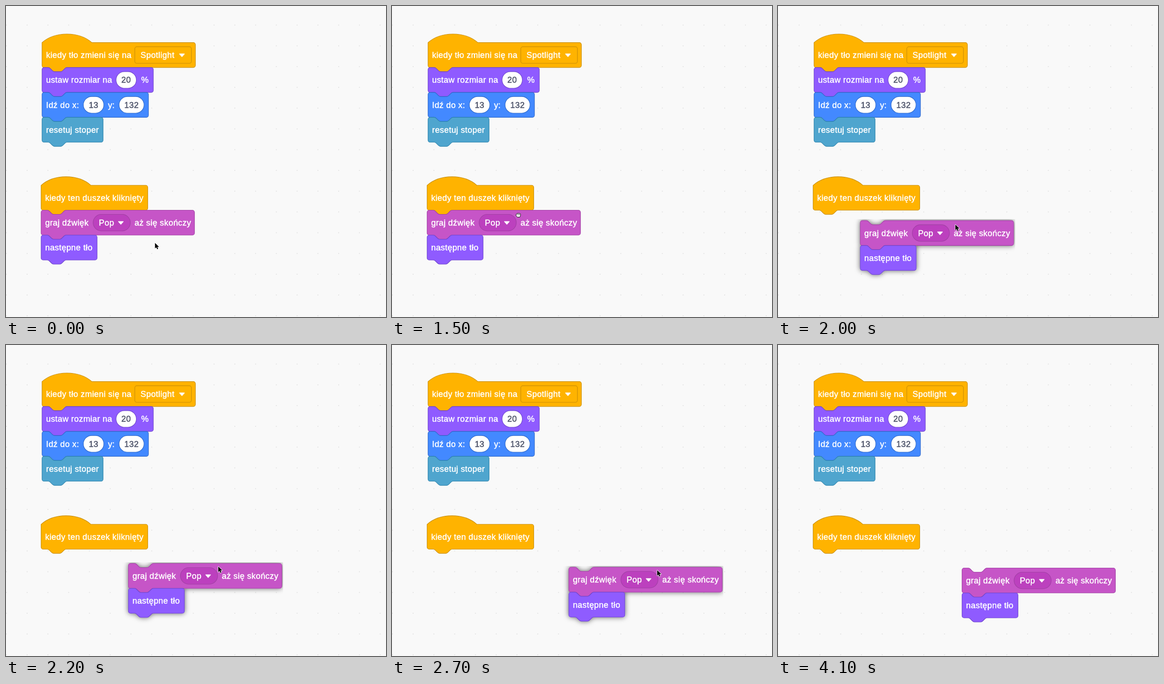
Animation of 827x677 px, one loop 4.2 s. Source, as an HTML page:

```html
<!DOCTYPE html>
<html lang="pl">
<head>
<meta charset="utf-8">
<style>
  html, body { margin: 0; width: 100%; height: 100%; overflow: hidden; background: #f9f9f9; }
  svg { display: block; }
  text {
    font: 16px "Liberation Sans", Arial, sans-serif; letter-spacing: .35px;
    fill: #fff; stroke: #fff; stroke-width: .45;
  }
  .number { fill: #4c5268; stroke: #4c5268; text-anchor: middle; }
</style>
</head>
<body>
<svg id="stage" width="827" height="677" viewBox="0 0 827 677">
  <defs>
    <pattern id="grid" x="23.4" y="18.9" width="45.2" height="45.2" patternUnits="userSpaceOnUse">
      <circle cx="22.6" cy="22.6" r="1.1" fill="#dcdcdc"/>
    </pattern>
    <filter id="shadow" filterUnits="userSpaceOnUse" x="-30" y="-2" width="327.4" height="150">
      <feDropShadow dx="0" dy="0" stdDeviation="5.3" flood-color="#000" flood-opacity=".6"/>
    </filter>
  </defs>
  <rect width="827" height="677" fill="url(#grid)"/>
</svg>
<script>
const SCALE = 1.13, ROW = 48;
const stage = document.getElementById('stage');
const $ = id => document.getElementById(id);

const colors = {
  event: ['#ffb300', '#c88d08'],
  looks: ['#8f5bff', '#6f47cc'],
  motion: ['#4389ff', '#2f68c8'],
  sensing: ['#4fa5ce', '#2b83ad'],
  sound: ['#c655c7', '#a03fa3']
};

// Block outlines, in editor units
const notch = 'H12c2 0 3 1 4 2l4 4c1 1 2 2 4 2h12c2 0 3-1 4-2l4-4c1-1 2-2 4-2';
const tab = 'H48c-2 0-3 1-4 2l-4 4c-1 1-2 2-4 2h-12c-2 0-3-1-4-2l-4-4c-1-1-2-2-4-2';
const outline = (width, hat) =>
  (hat ? 'M0 0c25-22 71-22 96 0' : 'M0 4a4 4 0 0 1 4-4' + notch) +
  `H${width - 4}a4 4 0 0 1 4 4v40a4 4 0 0 1-4 4${tab}H4a4 4 0 0 1-4-4z`;

const label = (x, words) => `<text x="${x}" y="29.7">${words}</text>`;
const field = (x, width, radius, fill) =>
  `<rect x="${x}" y="8" width="${width}" height="32" rx="${radius}" fill="${fill}"/>`;
const number = (x, width, value) => field(x, width, 16, '#fff') +
  `<text class="number" stroke="none" x="${x + width / 2}" y="29.7">${value}</text>`;
const menu = (x, width, radius, fill, words) => field(x, width, radius, fill) +
  label(x + 11, words) +
  `<path transform="translate(${x + width - 18.2} 24.4)" d="M-4.5-2.5h9L0 2.5z"
    fill="#fff" stroke="#fff" stroke-width="1.5" stroke-linejoin="round"/>`;

function block(row, kind, width, content, hat) {
  const [fill, edge] = colors[kind];
  return `<g transform="translate(0 ${row * ROW})" stroke="${edge}">
    <path d="${outline(width, hat)}" fill="${fill}"/>${content}</g>`;
}
const place = (x, y) => `translate(${x} ${y}) scale(${SCALE})`;
const stack = (id, x, y, content) =>
  `<g id="${id}" transform="${place(x, y)}">${content}</g>`;

const home = { x: 76.4, y: 444.5 };
const fingers = 'M-3.4 1V-3.2M-1.1 0V-5M1.3 0V-4.6M3.7 1V-3M-5.2 1.2l2.4 2.6';
const openPalm = 'M-3.6 0h7.5v2.6l-1.5 3h-4l-2-2.6z';
const fist = 'M-4.2-2.3q1-1.8 2.2-.8q1-1.4 2.2-.2q1.2-1.2 2.2.2q1.8-.8 2.3 1v3l-1.4 3.6h-5.6l-2.6-3z';

stage.insertAdjacentHTML('beforeend',
  stack('top', 78.4, 79.6,
    block(0, 'event', 295.4, label(7.8, 'kiedy tło zmieni się na') +
      menu(178.7, 109, 4, colors.event[0], 'Spotlight'), true) +
    block(1, 'looks', 214.4, label(7.8, 'ustaw rozmiar na') +
      number(142.6, 39, 20) + label(191, '%')) +
    block(2, 'motion', 205, label(7.8, 'Idź do x:') + number(79.6, 39.4, 13) +
      label(127, 'y:') + number(148.4, 48, 132)) +
    block(3, 'sensing', 117.6, label(7.8, 'resetuj stoper'))) +
  stack('click', 76.4, 390.3,
    block(0, 'event', 205.4, label(7.8, 'kiedy ten duszek kliknięty'), true)) +
  `<path id="marker" transform="${place(home.x, home.y)}" d="${outline(295.4)}" opacity=".23"/>` +
  stack('dragged', home.x, home.y,
    block(0, 'sound', 295.4, label(7.8, 'graj dźwięk') +
      menu(100.2, 71.6, 16, '#bc41be', 'Pop') + label(180, 'aż się skończy')) +
    block(1, 'looks', 107.8, label(7.8, 'następne tło'))) +
  `<g id="cursor" stroke-linecap="round" stroke-linejoin="round">
    <path id="arrow" d="M0 0V12l2.8-2.6 1.9 4.3 2.1-.9-1.9-4.2h3.9z"
      stroke="#fff" stroke-width="1.6" paint-order="stroke"/>
    <g id="open" fill="none">
      <path d="${fingers}${openPalm}" stroke="#111" stroke-width="3.6"/>
      <path d="${openPalm}" fill="#fff"/>
      <path d="${fingers}" stroke="#fff" stroke-width="1.5"/>
    </g>
    <g id="closed" fill="#fff" stroke="#111">
      <path d="${fist}"/>
      <path d="M-1.9-2v2M.3-2v2M2.5-2v2" stroke-width=".8"/>
    </g>
  </g>`);

// Rows of [time, x, y]
const cursorPath = [
  [0, 324.3, 515.8], [100, 324.3, 515.8], [700, 284.5, 456], [1100, 284.5, 456],
  [1500, 275, 455], [1600, 283, 458], [1700, 297, 463.3], [1800, 321, 467],
  [2000, 386, 476], [2400, 538, 488.5], [2600, 572, 490], [3000, 592.5, 491],
  [3600, 592.3, 491.3], [4000, 604, 668], [4100, 610, 720]
];
const dragPath = [
  [0, 0, 0], [1500, 0, 0], [1600, 8, 3], [1700, 22.4, 8.2], [1800, 43, 13],
  [2000, 102.6, 22.6], [2200, 190, 31], [2400, 263.7, 37.6], [2600, 303, 39],
  [3000, 324.8, 40], [3200, 324.8, 40.4], [3400, 324.8, 40.4], [3500, 324.1, 41]
];

function at(path, t) {
  const next = path.findIndex(point => point[0] > t);
  if (next < 0) return path[path.length - 1].slice(1);
  const [t0, x0, y0] = path[next - 1], [t1, x1, y1] = path[next];
  const k = (t - t0) / (t1 - t0);
  return [x0 + (x1 - x0) * k, y0 + (y1 - y0) * k];
}
const show = (id, on) => $(id).setAttribute('visibility', on ? 'visible' : 'hidden');

function draw(now) {
  const t = Math.floor(now % 4200 / 100) * 100; // ten pictures a second
  const [dx, dy] = at(dragPath, t);
  const [cx, cy] = at(cursorPath, t);
  const dragging = t >= 1600 && t < 3500;
  $('dragged').setAttribute('transform', place(home.x + dx, home.y + dy));
  if (dragging) $('dragged').setAttribute('filter', 'url(#shadow)');
  else $('dragged').removeAttribute('filter');
  $('cursor').setAttribute('transform', `translate(${cx} ${cy})`);
  const open = t < 1500 && cy < 499;
  const closed = t >= 1500 && t < 1800;
  show('marker', dragging && t < 1900);
  show('open', open);
  show('closed', closed);
  show('arrow', !open && !closed);
  requestAnimationFrame(draw);
}
requestAnimationFrame(draw);
</script>
</body>
</html>
```
